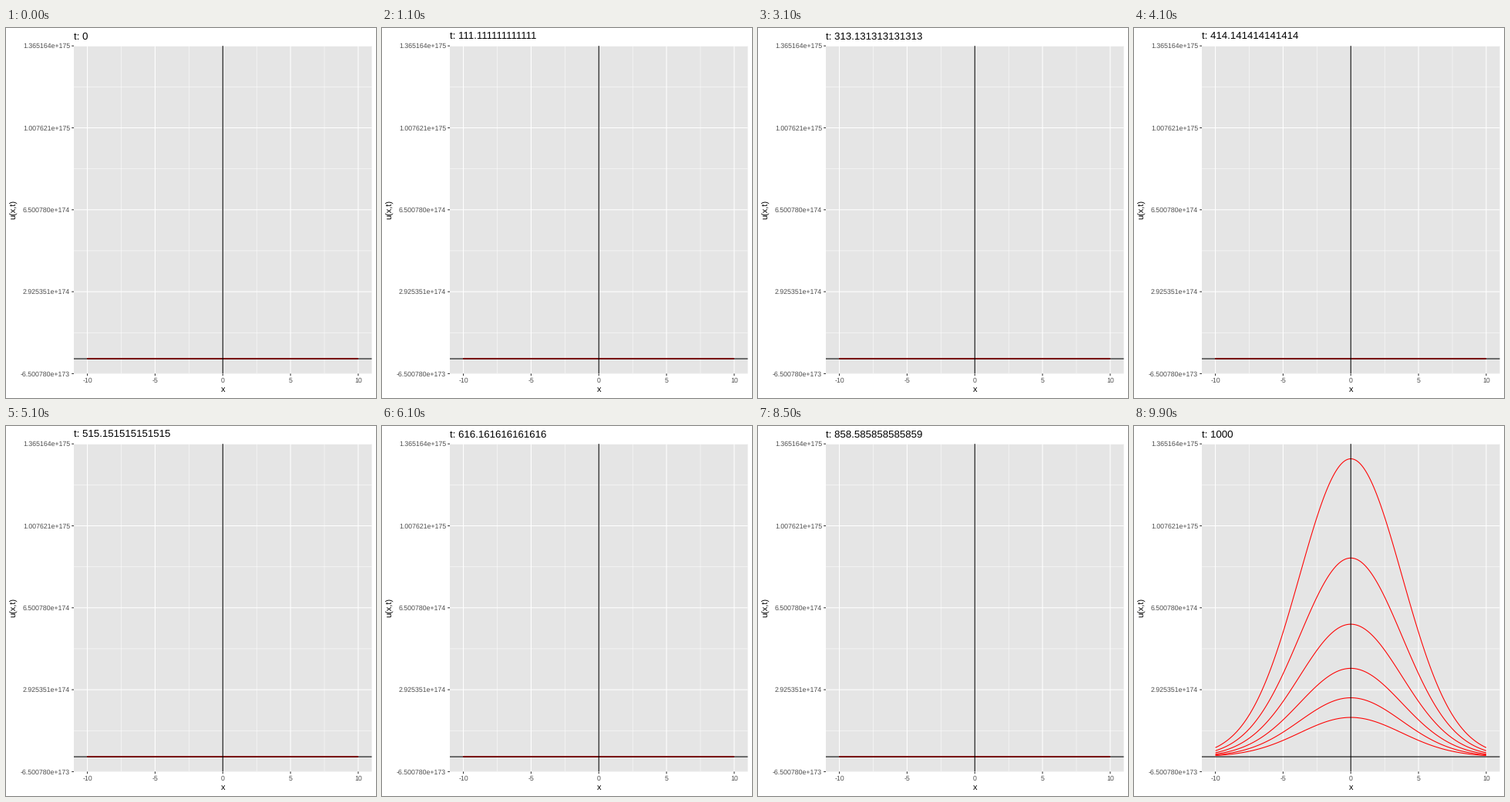
Animation of 480x480 px, one loop 10000 ms. Source, as a matplotlib script:

```python
import numpy as np
import matplotlib.pyplot as plt
from matplotlib.animation import FuncAnimation
from matplotlib.collections import LineCollection
from matplotlib.patches import Rectangle

plt.rcParams.update({
    "font.family": "Liberation Sans",
    "path.snap": False,
    "text.hinting": "none",
    "axes.unicode_minus": False,
})

SIZE, DPI = 480, 72          # at 72 dpi one point is one pixel
FRAMES, T_END = 100, 1000
LEFT, RIGHT, TOP, BOTTOM = 88.0, 474.5, 23.2, 448.4
LINE = 1.067

GROWTH = 1.5
PEAK = 1.300156e175
U_MIN, U_MAX = -0.05 * PEAK, 1.05 * PEAK

fig = plt.figure(figsize=(SIZE / DPI, SIZE / DPI), dpi=DPI, facecolor="white")
ax = fig.add_axes([0, 0, 1, 1])
ax.set_xlim(0, SIZE)
ax.set_ylim(SIZE, 0)
ax.axis("off")

panel = Rectangle((LEFT, TOP), RIGHT - LEFT, BOTTOM - TOP,
                  facecolor="#e5e5e5", edgecolor="none", zorder=0)
ax.add_patch(panel)


def px(x):
    return LEFT + (x + 11) / 22 * (RIGHT - LEFT)


def py(u):
    return BOTTOM - (u - U_MIN) / (U_MAX - U_MIN) * (BOTTOM - TOP)


def stroke(xs, ys, color, width, z, clip=True):
    line, = ax.plot(xs, ys, color=color, lw=width, zorder=z,
                    solid_capstyle="butt")
    if clip:
        line.set_clip_path(panel)


def vline(x, color, width, z):
    stroke([px(x)] * 2, [TOP, BOTTOM], color, width, z)


def hline(u, color, width, z):
    stroke([LEFT, RIGHT], [py(u)] * 2, color, width, z)


def label(x, y, text, size, color="black", ha="center", **kw):
    return ax.text(x, y, text, fontsize=size, color=color, ha=ha,
                   va="baseline", **kw)


def density(t):
    """Spreading, growing Gaussian at time t."""
    var = 1 + t / 75
    return GROWTH ** t * np.exp(-X ** 2 / (2 * var)) / np.sqrt(2 * np.pi * var)


# Grid
x_breaks = np.linspace(-10, 10, 5)
u_breaks = np.linspace(U_MIN, U_MAX, 5)
for x in (x_breaks[1:] + x_breaks[:-1]) / 2:
    vline(x, "white", LINE / 2, 1)
for u in (u_breaks[1:] + u_breaks[:-1]) / 2:
    hline(u, "white", LINE / 2, 1)
for x in x_breaks:
    vline(x, "white", LINE, 2)
for u in u_breaks:
    hline(u, "white", LINE, 2)

# Curves, with the axes on top
X = np.linspace(-10, 10, 201)
curves = LineCollection([], colors="red", linewidths=LINE, zorder=3,
                        capstyle="butt")
ax.add_collection(curves, autolim=False)
curves.set_clip_path(panel)
hline(0, "black", LINE, 4)
vline(0, "black", LINE, 4)

# Ticks and labels
for x in x_breaks:
    stroke([px(x)] * 2, [BOTTOM, BOTTOM + 2.75], "#333333", LINE, 5, False)
    label(px(x), 459.7, f"{x:.0f}", 8.8, "#4d4d4d")
for u in u_breaks:
    stroke([LEFT - 2.75, LEFT], [py(u)] * 2, "#333333", LINE, 5, False)
    label(LEFT - 4.95, py(u) + 3.15, f"{u:.6e}", 8.8, "#4d4d4d", "right")
label(px(0), 472.2, "x", 11)
label(13.4, (TOP + BOTTOM) / 2, "u(x,t)", 11, rotation=90,
      rotation_mode="anchor")
title = label(LEFT, 15, "", 13.2, ha="left")

# Every whole time step belongs to its nearest frame
steps = np.arange(T_END + 1)
nearest = np.round(steps * (FRAMES - 1) / T_END)


def update(i):
    title.set_text(f"t: {i * T_END / (FRAMES - 1):.15g}")
    curves.set_segments([np.column_stack([px(X), py(density(float(t)))])
                         for t in steps[nearest == i]])
    return title, curves


anim = FuncAnimation(fig, update, frames=FRAMES, interval=100,
                     init_func=lambda: update(0), repeat=True, repeat_delay=0)
plt.show()
```
